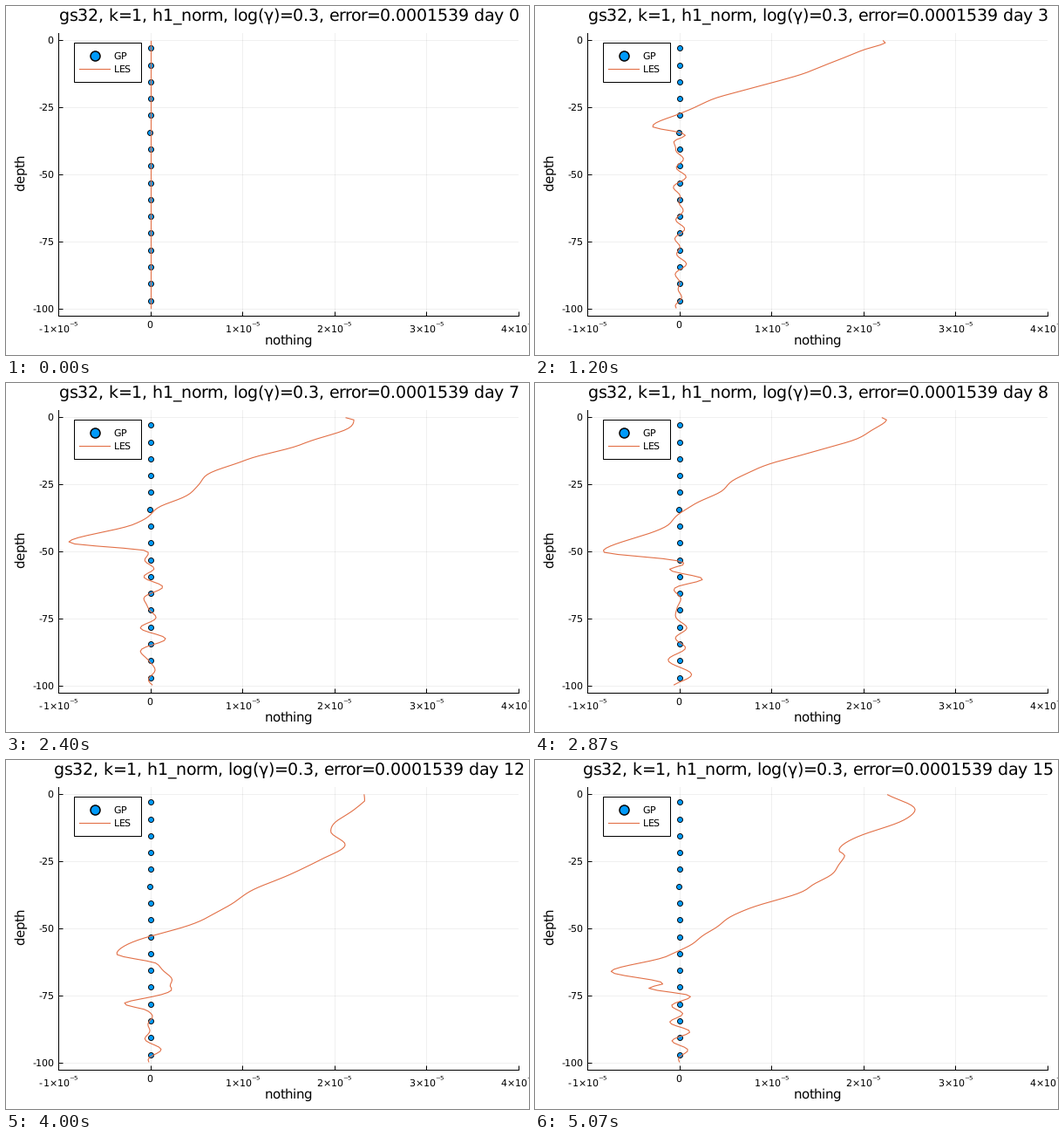
Recreate the animation shown at these times as a matplotlib script. Size 600 by 400 pixels, loop 5.14 s.

```python
import math
from functools import lru_cache

import numpy as np
import matplotlib.pyplot as plt
from matplotlib.animation import FuncAnimation
from matplotlib.patches import PathPatch, Rectangle
from matplotlib.path import Path
from matplotlib.textpath import TextPath

W, H, DPI = 600, 400, 100
PT = 72 / DPI
LOOP, TICK = 5140, 20
STEPS = 77
BLUE, ORANGE = "#009AFA", "#E26F46"

plt.rcParams["font.family"] = "DejaVu Sans"
rng = np.random.default_rng(4)
depth = (np.arange(128) + .5) * 100 / 128

# Step -> key points (depth, flux in 1e-6) of the mixed layer
LAYERS = {
    10: [(1, 21.8), (11, 10.4), (14, 7), (20.8, -.1), (24.2, -3.5), (26.6, -.5)],
    26: [(.4, 22.5), (1.2, 23.1), (4.9, 20.1), (14.6, 15.1), (22.4, 7.2),
         (26.6, 3.1), (33.1, -.1), (38.6, -2.5), (41.8, 1.6), (44.2, -1.3)],
    36: [(.4, 21.5), (1.2, 22.4), (10.4, 16.3), (16.1, 10.3), (22.7, 5.8),
         (27.9, 4.5), (33.4, 1.2), (39.9, -1.7), (46.7, -8.9), (50, -.5)],
    49: [(1.4, 22.5), (8.5, 19.5), (20.1, 8.4), (28.9, 3.9), (34.7, .2),
         (41.8, -1.9), (52.8, -7.9), (57.5, 2), (59.7, -.8), (63.1, 1.8)],
    60: [(2.7, 23.3), (14, 19.6), (18.7, 21.2), (24, 18.8), (38.2, 9.9),
         (46, 6.3), (59.5, -3.8), (63.3, .8), (72.2, 2.8), (77.6, -3)],
    76: [(.4, 22.7), (6.2, 25.6), (21.1, 17.2), (23, 17.9), (35, 14.2),
         (43.1, 7.2), (60.2, -1.2), (66.1, -7.3), (70.6, -1.7), (72.2, -3.2)],
}


class Layer:
    """Monotone cubic through the key points, fading to zero below them."""

    def __init__(self, pts):
        self.d, self.f = np.array(pts + [(pts[-1][0] + 3, 0)], float).T
        self.peak = self.d[np.argmin(self.f)]
        s = np.diff(self.f) / np.diff(self.d)
        a, b = s[:-1], s[1:]
        same = a * b > 0
        mid = np.where(same, 2 * a * b / np.where(same, a + b, 1), 0)
        self.m = np.concatenate([s[:1], mid, [0]])

    def __call__(self, peak):
        """Flux with the minimum stretched to the depth `peak`."""
        d, f, m = self.d, self.f, self.m
        x = np.where(depth < peak, depth * self.peak / peak, self.peak + depth - peak)
        x = np.clip(x, d[0], d[-1])
        i = np.clip(np.searchsorted(d, x) - 1, 0, len(d) - 2)
        w = d[i + 1] - d[i]
        u = (x - d[i]) / w
        return ((1 + 2 * u) * (1 - u) ** 2 * f[i] + u * (1 - u) ** 2 * w * m[i]
                + u * u * (3 - 2 * u) * f[i + 1] + u * u * (u - 1) * w * m[i + 1])


layers = {k: Layer(pts) for k, pts in LAYERS.items()}
keys = list(layers)
waves = list(zip(rng.uniform(.3, 1, 6), rng.uniform(-.6, .6, 6), rng.uniform(0, 6.28, 6)))


def flux(k):
    """The mixed layer deepens like the root of time; ripples run below it."""
    if k == 0:
        return 0 * depth
    peak = np.interp(math.sqrt(k), np.sqrt([0] + keys),
                     [0] + [p.peak for p in layers.values()])
    b = next(key for key in keys if key >= k)
    a = max([key for key in keys if key < k], default=b)
    u = (k - a) / (b - a) if b > a else 0
    layer = (1 - u) * layers[a](peak) + u * layers[b](peak)
    ripple = sum(np.sin(q * depth + w * k + c) for q, w, c in waves)
    calm = np.clip((depth - peak) / 10, .15, 1)
    return layer + .4 * min(k / 40, 1) * calm * ripple


curves = [flux(k) for k in range(STEPS)]

fig = plt.figure(figsize=(W / DPI, H / DPI), dpi=DPI, facecolor="white")
L, R, T, B = 60.3, 587.7, 30.6, 355.2
ax = fig.add_axes([L / W, 1 - B / H, (R - L) / W, (B - T) / H])
ax.set(xlim=(-10, 40), ylim=(-102.6, 2.6),
       xticks=range(-10, 41, 10), yticks=range(-100, 1, 25))
ax.tick_params(direction="in", length=5 * PT, width=PT, labelbottom=False, labelleft=False)
ax.grid(color="black", alpha=.06, lw=PT)
ax.set_axisbelow(True)
ax.spines[["top", "right"]].set_visible(False)
ax.spines[["left", "bottom"]].set_linewidth(PT)

dot = dict(marker="o", ls="", mfc=BLUE, mec="black", snap=False)
ax.plot(rng.uniform(-.04, .04, 16), -3.125 - 6.25 * np.arange(16),
        ms=6 * PT, mew=.9 * PT, **dot)
les, = ax.plot(curves[0], -depth, color=ORANGE, lw=1.1 * PT, zorder=3)

# Overlay in pixel coordinates for text and legend
top = fig.add_axes([0, 0, 1, 1])
top.set(xlim=(0, W), ylim=(H, 0))
top.axis("off")


@lru_cache(None)
def advance(c, size):
    """Whole-pixel advance of one character."""
    def right(s):
        return TextPath((0, 0), s, size=size).vertices[:, 0].max()
    return math.floor(right(c + "|") - right("|") + .02)


def width(s, size=11):
    return sum(advance(c, size) for c in s)


def outline(x, y, s, size=11, align=.5, turned=False):
    shift = round(align * width(s, size))
    glyphs = [TextPath((width(s[:i], size) - shift, 0), c, size=size)
              for i, c in enumerate(s) if not c.isspace()]
    path = Path.make_compound_path(*glyphs)
    vx, vy = path.vertices.T
    xy = (x - vy, y - vx) if turned else (x + vx, y - vy)
    return Path(np.column_stack(xy), path.codes)


def label(*args, **kw):
    return top.add_patch(PathPatch(outline(*args, **kw), fc="black", lw=0, snap=False))


for d in range(-100, 1, 25):
    label(55, round(T + (2.6 - d) * (B - T) / 105.2) + 4, str(d), align=1)
for n in range(-1, 5):
    x = L + (n + 1) * (R - L) / 5
    if n == 0:
        label(round(x), 369, "0")
        continue
    base = ("-\u2009" if n < 0 else "") + f"{abs(n)}×10"
    left = round(x - width(base + "⁻⁵") / 2)
    label(left, 374, base, align=0)
    label(left + width(base), 370, "⁻⁵", align=0)

label(324, 388, "nothing", 15)
label(21, 193, "depth", 15, turned=True)


def title_path(day):
    return outline(325, 17, f"gs32, k=1, h1_norm, log(γ)=0.3, error=0.0001539 day {day}", 19)


titles = [title_path(day) for day in range(16)]
title = top.add_patch(PathPatch(titles[0], fc="black", lw=0, snap=False))

top.add_patch(Rectangle((78, 42), 77, 45, fc="white", ec="black", lw=PT))
top.plot([101.5], [57], ms=11 * PT, mew=1.5 * PT, **dot)
top.plot([84, 119], [72, 72], color=ORANGE, lw=1.1 * PT)
label(124, 61, "GP", align=0)
label(124, 76, "LES", align=0)


def update(i):
    t = i * TICK + TICK // 2
    k = min((t + 5) * 3 // 200, STEPS - 1)
    les.set_xdata(curves[k])
    title.set_path(titles[k * 5 // 24])  # five hours per step
    return les, title


anim = FuncAnimation(fig, update, frames=LOOP // TICK, interval=TICK, repeat=True,
                     repeat_delay=0, blit=False)
plt.show()
```
